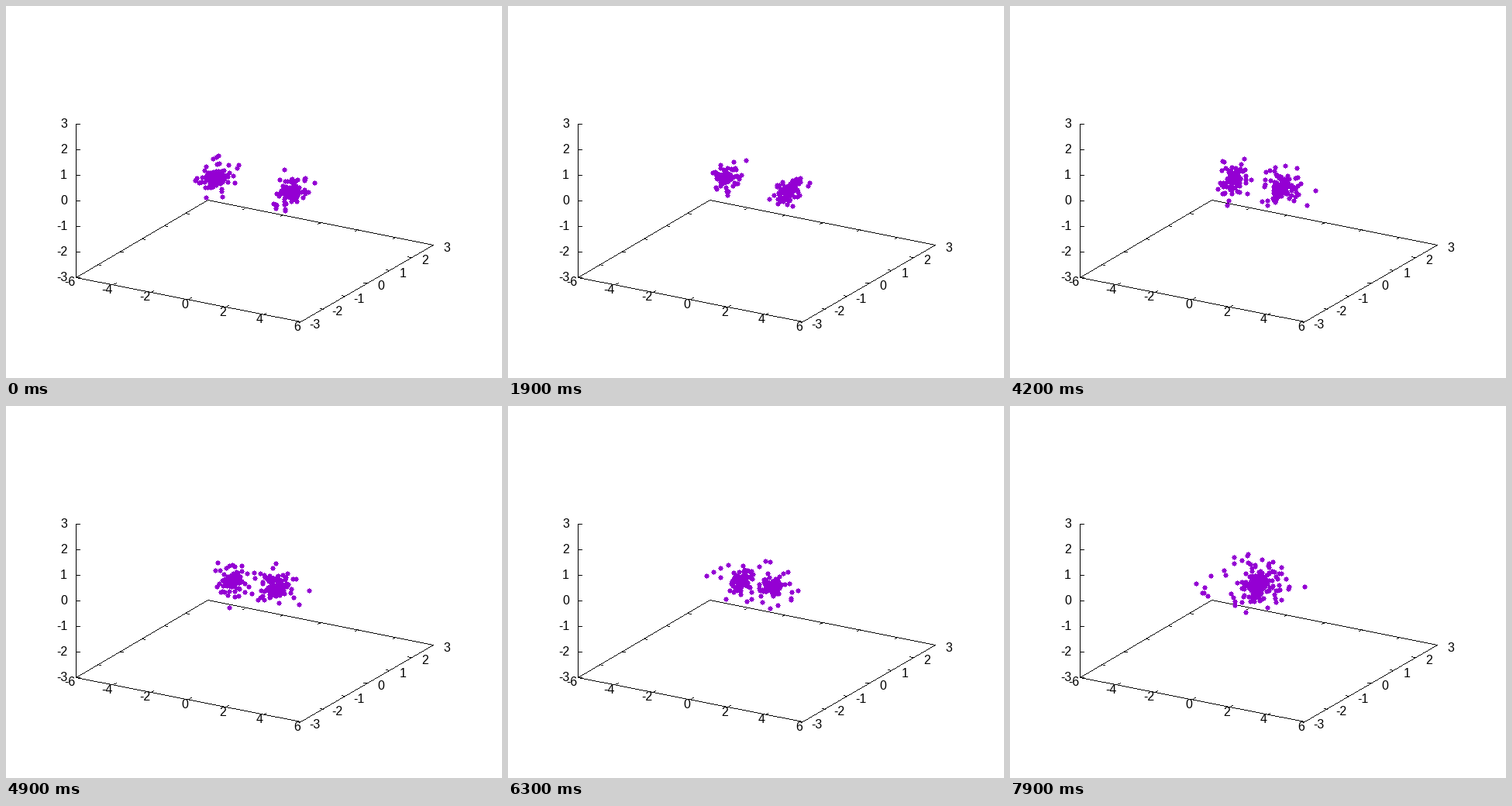
Animation, 640 px wide and 480 px high, one loop 8000 ms. Source, as a matplotlib script:

```python
import numpy as np
import matplotlib.pyplot as plt
from matplotlib.animation import FuncAnimation
from matplotlib.path import Path

W, H, DPI = 640, 480, 100
PX = 72 / DPI
FRAMES, STEP = 80, 100
VIOLET = "#9400d3"

plt.rcParams["font.family"] = "Liberation Sans"
plt.rcParams["toolbar"] = "None"
fig = plt.figure(figsize=(W / DPI, H / DPI), dpi=DPI, facecolor="white")
ax = fig.add_axes([0, 0, 1, 1])
ax.set_xlim(0, W)
ax.set_ylim(H, 0)
ax.axis("off")

# Screen vectors of one unit along x, y and z
AXES = np.array([[24.17, 4.78], [28.4, -16.6], [0, -33]])
ORIGIN = np.array([320.3, 229.7])
canvas = np.full((H, W, 3), 255, np.uint8)


def project(p):
    return ORIGIN + np.asarray(p, float) @ AXES


def line(a, b):
    """One pixel wide line without smoothing."""
    a, b = np.round(a), np.round(b)
    n = int(np.abs(b - a).max()) + 1
    x, y = np.round(np.linspace(a, b, n)).astype(int).T
    canvas[y, x] = 0


def tick(p, axis, sign):
    a = project(p)
    line(a, a + sign * 4 * AXES[axis] / np.hypot(*AXES[axis]))


def label(x, y, value, ha):
    ax.text(x, y + 5, str(value), fontsize=16 * PX, ha=ha, va="baseline",
            color="black", zorder=2)


# Box: floor outline and vertical axis
corners = [(90, 350), (380, 407), (551, 308), (260, 250)]
for a, b in zip(corners, corners[1:] + corners[:1]):
    line(a, b)
line((90, 152), (90, 350))

for k in range(7):
    v = k - 3
    zy = 350 - 33 * k
    line((90, zy), (95, zy))
    label(79, zy, v, "right")
    label(89.5 + 48.5 * k, 356 + 9.65 * k, 2 * v, "right")
    label(398.5 + 28.4 * k, 411 - 16.55 * k, v, "center")
    if 0 < k < 6:
        tick((2 * v, -3, -3), 1, 1)
        tick((2 * v, 3, -3), 1, -1)
        tick((-6, v, -3), 0, 1)
        tick((6, v, -3), 0, -1)

fig.figimage(canvas, origin="upper", zorder=-1)

# Two clusters, each with a dense core and a loose halo
rng = np.random.default_rng(7)
CORE, HALO = 80, 20


def halo_arm(n):
    d = rng.normal(size=(n, 3))
    d /= np.linalg.norm(d, axis=1, keepdims=True)
    return d * rng.uniform(.3, .85, (n, 1))


def cluster():
    size = .2 * rng.lognormal(0, .25, (CORE, 1))
    arms = [np.vstack([rng.normal(size=(CORE, 3)) * size, halo_arm(HALO)])
            for _ in range(2)]
    speed = np.append(rng.uniform(.9, 1.7, CORE), rng.uniform(.3, .6, HALO))
    kick = np.append(np.zeros(CORE), rng.uniform(-1, 1, HALO))
    return *arms, speed, kick


clusters = [(-1, cluster()), (1, cluster())]


def stars(t):
    # Steady approach that quickens near the encounter
    offset = 2 - .17 * t - .5 * (t / 7.9) ** 6
    breath = .88 + .12 * np.cos(1.55 * t)
    out = []
    for side, (a, b, speed, kick) in clusters:
        phase = (speed * t)[:, None]
        p = a * np.cos(phase) + b * np.sin(phase)
        p[:CORE] *= breath + .3 * (t / 7.9) ** 6
        p[CORE:] *= breath + .05 * t
        p[:, 0] += side * offset + .03 * kick * t ** 2
        out.append(project(p))
    return np.round(np.vstack(out))


# Blocky dot: a 5 px square with a 1 px nub on every side
quarter = [(3.5, .5), (2.5, .5), (2.5, 2.5), (.5, 2.5), (.5, 3.5)]
outline = []
for _ in range(4):
    outline += quarter
    quarter = [(-y, x) for x, y in quarter]
dot = Path(outline + outline[:1], closed=True)

dots, = ax.plot([], [], ls="none", marker=dot, ms=7 * PX, mew=0,
                color=VIOLET, antialiased=False, zorder=3)


def draw(i):
    dots.set_data(*stars(i * STEP / 1000).T)
    return dots,


anim = FuncAnimation(fig, draw, frames=FRAMES, init_func=lambda: draw(0),
                     interval=STEP, repeat=True, repeat_delay=0, blit=False)
plt.show()
```
